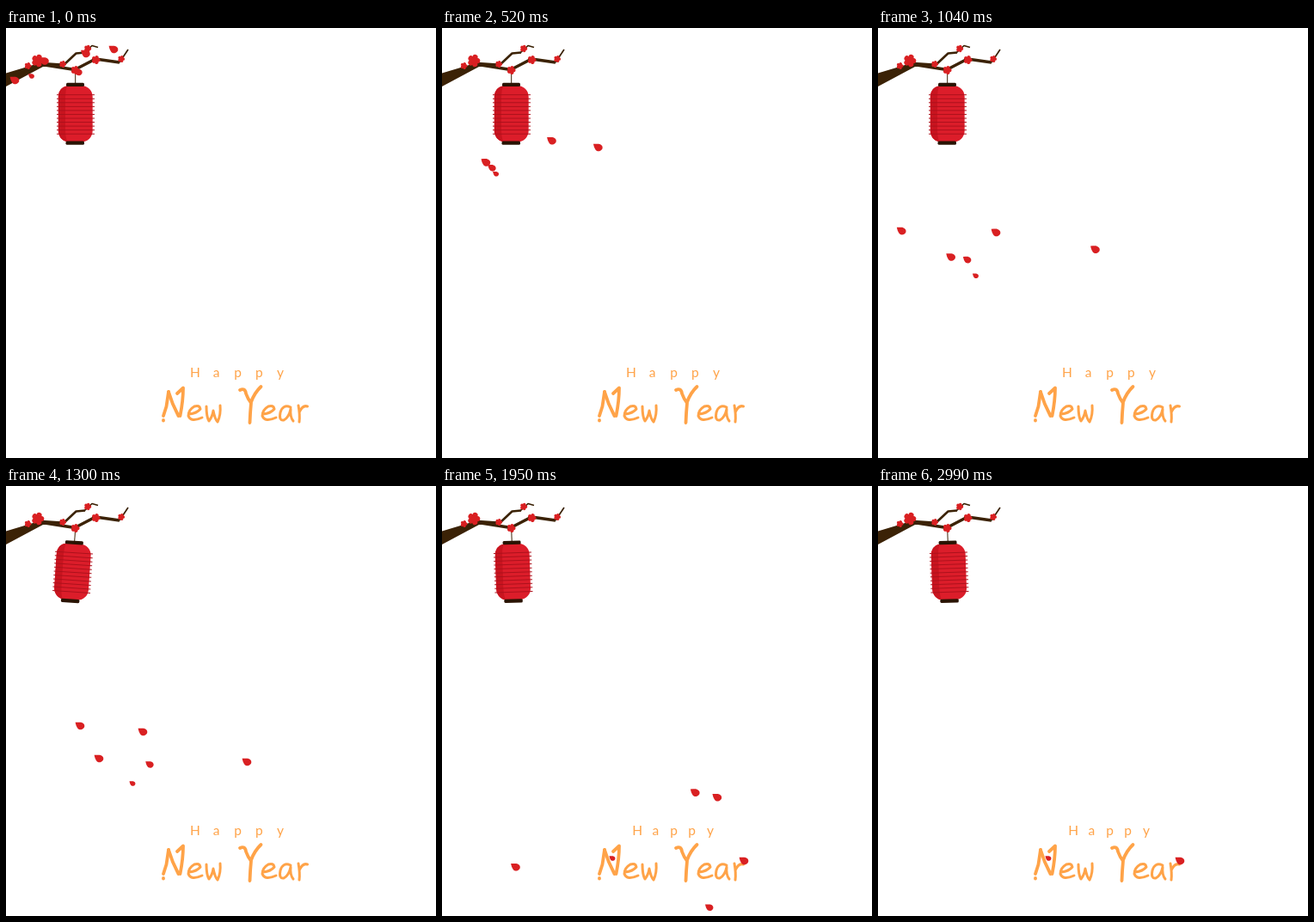
An HTML page for the animation above (3120 ms loop, 500 px wide and 500 px high).

```html
<!DOCTYPE html>
<html lang="en">
<head>
<meta charset="utf-8">
<title>Happy New Year</title>
<style>
  html, body { margin: 0; width: 100%; height: 100%; overflow: hidden; background: #fff; }
  svg { display: block; width: 100vw; height: 100vh; }
  #happy { font: 400 15.5px Lato, "Open Sans", sans-serif; text-anchor: middle; fill: #ffa348; }
  .line { fill: none; stroke-linejoin: round; }
  .ink { stroke: #ffa348; stroke-linecap: round; }
</style>
</head>
<body>
<svg viewBox="0 0 500 500">
  <defs>
    <path id="petal" d="M-5.400 -4.200C-1 -4.300 1 -4.500 2 -3.900C6.500 -2.700 6.500 3.200 1.600 4.300C-2.700 4.800 -4.300 1 -5.400 -4.200Z"/>
    <g id="flower"></g>
  </defs>

  <g id="lantern">
    <path d="M80.7 48V65" stroke="#3b2206"/>
    <rect x="60.7" y="67" width="40" height="65.5" rx="13" fill="#dc1d2a"/>
    <path d="M71 67.3Q61 69 61 80V119Q61 130 71 132.2Q69 126 69 119V80Q69 73 71 67.3Z" fill="#c9141f"/>
    <path id="ribs" stroke="#ad111c"/>
    <g fill="#2a1404">
      <rect x="70" y="63.8" width="21" height="4.2" rx="1.5"/>
      <rect x="69.5" y="131.5" width="21.5" height="4.3" rx="1.5"/>
    </g>
  </g>

  <g class="line" stroke="#3b2206">
    <path d="M0 52.500L25 45L42 39.800L68 41.500V44.500L43 45L0 68Z" fill="#3b2206" stroke="none"/>
    <path d="M42 42.500L80 48.500L104 36L132 40" stroke-width="3.5"/>
    <path d="M66 44L81.500 29.500L92 28.500" stroke-width="2.6"/>
    <path d="M91 29L100 20.500L107 22.500M132 40L142 25" stroke-width="1.7"/>
  </g>
  <g id="flowers" fill="#d92022"></g>

  <text id="happy" y="405.5">Happy</text>
  <g class="line ink" role="img" aria-label="New Year">
    <g stroke-width="3.8">
      <path d="M189 423L186.500 440L183 451M183 456V456.500"/>
      <path d="M189 423Q193 437 200.500 451M199 425L206 418.500Q206 433 202.500 451"/>
      <path d="M272 421Q278 418 279 425Q281 431 285 436Q284 446 283.500 459M285 435Q289 424 296.500 417"/>
    </g>
    <g stroke-width="3">
      <path id="e" d="M213 449Q222 448 226 443Q225 438 219 440Q212 444 212 451Q215 459 228 453"/>
      <use href="#e" x="86"/>
      <path d="M233 440Q233 452 236 457Q240 452 241 445Q243 455 246 458Q250 450 249 439"/>
      <path d="M331 441Q322 437 319 447Q317 457 323 456Q329 453 331 443Q330 452 334 457"/>
      <path d="M340 439Q342 450 341 458M341 447Q345 438 350.500 440"/>
    </g>
  </g>
  <g id="petals" fill="#d92022"></g>
</svg>
<script>
const STEP = 130, STEPS = 24;
const $ = id => document.getElementById(id);

function add(parent, tag, attrs) {
  const el = document.createElementNS('http://www.w3.org/2000/svg', tag);
  for (const k in attrs) el.setAttribute(k, attrs[k]);
  return parent.appendChild(el);
}

$('ribs').setAttribute('d', Array.from({ length: 11 }, (_, i) => `M59 ${77.7 + i * 4.55}h44`).join(''));

for (let i = 0; i < 5; i++) {
  add($('flower'), 'circle', { cy: -.58, r: .44, transform: `rotate(${i * 72 + 20})` });
}
add($('flower'), 'circle', { r: .45 });

function flower(x, y, r) {
  add($('flowers'), 'use', { href: '#flower', transform: `translate(${x} ${y}) scale(${r})` });
}
flower(37, 38, 7.2);
flower(25.5, 44, 4);
flower(66, 42, 4);
flower(80.5, 49, 5);
flower(95, 24, 4.2);
flower(104.5, 37, 5);
flower(134, 36, 4);

// Points passed at step 2 and every 4 steps after it
const FIRST = 2, BEAT = 4;
const petals = [];
function petal(size, rests, ...points) {
  petals.push({ size, rests, points, el: add($('petals'), 'use', { href: '#petal' }) });
}
petal(1, true, [136, 85], [223, 195], [280, 321], [351, 436]);
petal(.65, true, [47, 113], [82, 227], [147, 346], [198, 433]);
petal(1, false, [127, 78], [131, 184], [159, 286], [290, 346], [406, 414], [530, 490]);
petal(1, false, [4, 104], [-8, 190], [86, 279], [262, 340], [374, 410], [495, 488]);
petal(1, false, [49, 97], [58, 214], [108, 317], [90, 418]);
petal(.88, false, [75, 107], [57, 218], [167, 324], [282, 457]);

// Smooth curve inside the points, straight on beyond both ends
function along({ points, rests }, step, axis) {
  const last = points.length - 1;
  let u = (step - FIRST) / BEAT;
  if (rests) u = Math.min(u, last);
  const i = Math.max(0, Math.min(last - 1, Math.floor(u)));
  const a = points[i][axis], b = points[i + 1][axis], f = u - i;
  const line = a + (b - a) * f;
  if (f < 0 || f > 1) return line;
  const before = i > 0 ? points[i - 1][axis] : 2 * a - b;
  const after = i + 2 <= last ? points[i + 2][axis] : 2 * b - a;
  const bendA = (2 * a - before - b) / 2, bendB = (2 * b - a - after) / 2;
  return line + f * (1 - f) * (bendA * (1 - f) + bendB * f);
}

function draw(now) {
  const step = Math.floor(now / STEP) % STEPS;
  const swing = 2 - Math.abs((step + 2) % 8 - 4);
  $('lantern').setAttribute('transform', `rotate(${swing * 1.9} 80.7 49)`);

  const gap = step % 2 ? 21.2 : 24.8;
  $('happy').setAttribute('x', [-2, -1, 0, 1, 2].map(i => 269.5 + i * gap).join(' '));

  for (const p of petals) {
    p.el.setAttribute('transform',
      `translate(${along(p, step, 0)} ${along(p, step, 1)}) scale(${p.size})`);
  }
}

const start = performance.now();
function tick() {
  draw(performance.now() - start);
  requestAnimationFrame(tick);
}
draw(0);
requestAnimationFrame(tick);
</script>
</body>
</html>
```
